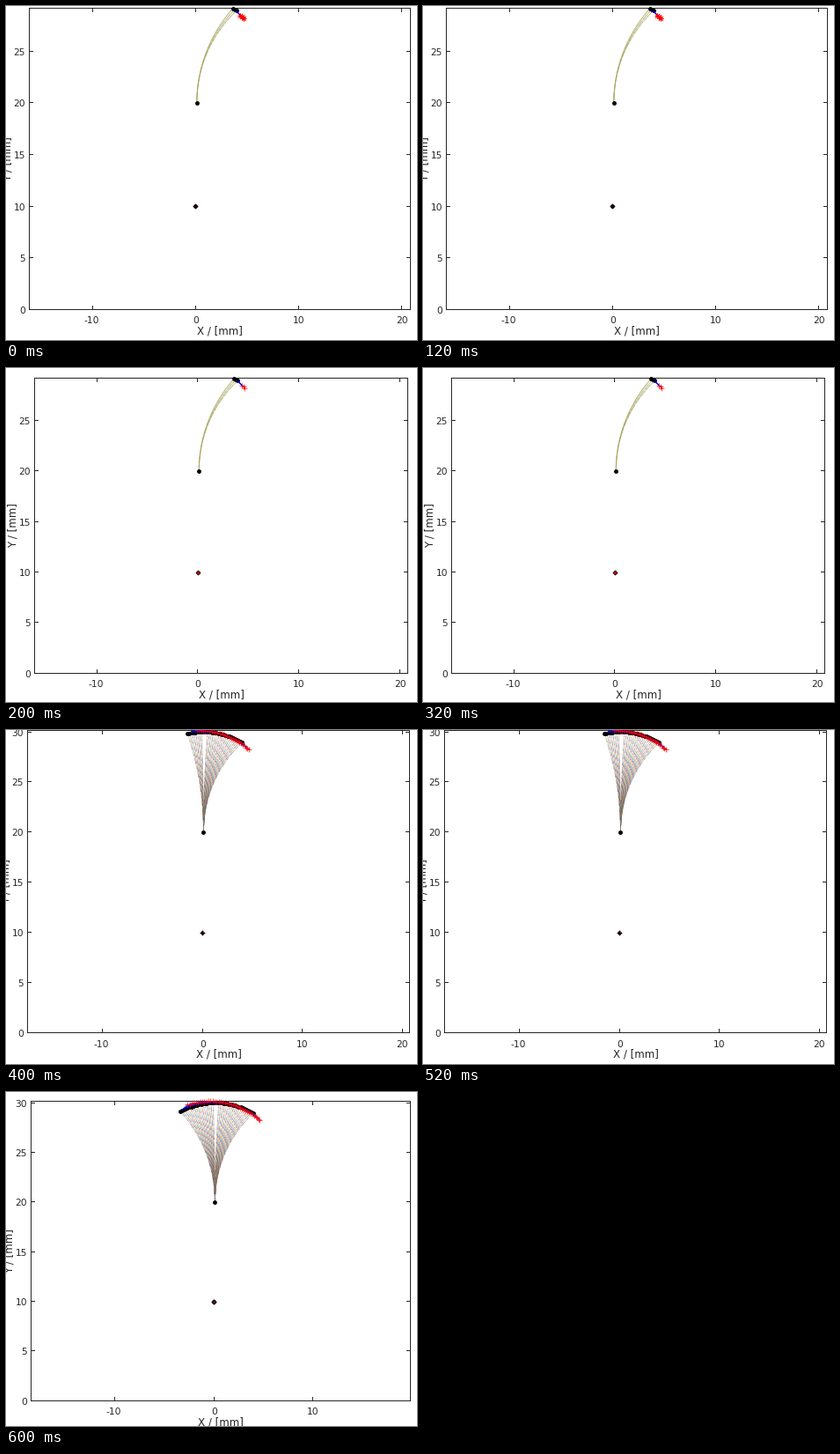
Write a matplotlib script that moves like this. It is 467x379 px and loops after 800 ms.

```python
import numpy as np
import matplotlib.pyplot as plt
from matplotlib.animation import FuncAnimation
from matplotlib.collections import LineCollection

W, H, DPI = 467, 379, 100
PX = 72 / DPI
INK = "#262626"
OLIVE = "#a3a552"
PALETTE = ["#0072bd", "#d95319", "#edb120", "#7e2f8e", "#77ac30", "#4dbeee", "#a2142f"]

ROOT = np.array([0.13, 20.0])
LENGTH = 10.0
START, STEP = 46.5, 2.325      # bending angle in degrees
STRAIGHT = (19, 20)            # nearly straight poses have no visible beam

# left, right, top, bottom, x of origin, pixels per mm, last pose, tip marker, pivot style
VIEWS = [
    (26, 459, 2, 344, 215.5, 11.71, 2, (8, 2, 0), "dark"),
    (32, 456, 11, 346, 218, 11.47, 2, "+", "red"),
    (24, 458, 0, 343, 223.2, 11.37, 28, "+", "dot"),
    (28, 459, 10, 350, 236.2, 11.27, 38, "+", "diamond"),
]

fig = plt.figure(figsize=(W / DPI, H / DPI), dpi=DPI, facecolor="white")
ax = fig.add_axes([0, 0, 1, 1])


def bend(angle, s):
    """Points of a constant-curvature beam at the relative lengths s."""
    s = np.asarray(s, float)
    if abs(angle) < 1e-6:
        return np.stack([ROOT[0] + 0 * s, ROOT[1] + LENGTH * s], -1)
    x = (1 - np.cos(angle * s)) / angle
    y = np.sin(angle * s) / angle
    return ROOT + LENGTH * np.stack([x, y], -1)


def pixel_center(v):
    return np.floor(v) + 0.5


def line(xs, ys, color=INK, width=1.0, **kw):
    ax.plot(xs, ys, color=color, lw=width * PX, snap=False, **kw)


def mark(point, shape, size, color, edge=0.8, **kw):
    ax.plot(*point, marker=shape, ms=size * PX, color=color, mew=edge * PX, ls="", **kw)


def label(x, y, text, size=10.6, **kw):
    style = dict(ha="center", va="center_baseline", color=INK, family="DejaVu Sans")
    style.update(kw)
    ax.text(x, y, text, fontsize=size * PX, **style)


def draw_axes(left, right, top, bottom, to_px):
    l, r, t, b = (v + 0.5 for v in (left, right, top, bottom))
    line([l, r, r, l, l], [t, t, b, b, t], solid_joinstyle="miter")
    for value in range(-10, 21, 10):
        x = pixel_center(to_px((value, 0))[0])
        if l < x < r:
            line([x, x], [b, b - 4])
            line([x, x], [t, t + 4])
            label(x - (1 if value < 0 else 0), b + 12, str(value))
    for value in range(0, 31, 5):
        y = pixel_center(to_px((0, value))[1])
        if t < y <= b:
            line([l, l + 4], [y, y])
            line([r, r - 4], [y, y])
            label(l - 4.5, y + 0.5, str(value), ha="right")
    label((l + r) / 2, b + 23, "X / [mm]", 11.9)
    label(l - 24.5, (t + b) / 2, "Y / [mm]", 11.9, rotation=90, va="center")


def draw_beam(angle, index, few, to_px):
    points = to_px(bend(angle, np.linspace(0, 1 if few else 0.97, 49)))
    segments = np.stack([points[:-1], points[1:]], axis=1)
    if few:
        colors = [OLIVE, "#c9b98c", OLIVE, "#a9a99c"] if index < 2 else [OLIVE]
    else:
        shift = 3 * index % 7
        colors = PALETTE[shift:] + PALETTE[:shift]
    ax.add_collection(LineCollection(segments, colors=colors, capstyle="butt",
                                     linewidths=(0.9 if few else 0.8) * PX,
                                     alpha=0.9 if few else 0.6))


def draw_tip(angle, shape, to_px):
    tip = bend(angle, 1)
    end = tip + [np.cos(angle), -np.sin(angle)]
    a, b = to_px(tip), to_px(end)
    line([a[0], b[0]], [a[1], b[1]], "blue", 0.8, zorder=3)
    mark(a, "o", 4, "black", zorder=3)
    mark(b, shape, 6, "red", 0.7, zorder=3)


def draw_pivot(style, to_px):
    p = to_px((0, 10))
    if style == "dark":
        mark(p, "o", 4, "black")
        mark(p, "+", 6, "#300000")
    elif style == "red":
        mark(p, "D", 3.6, "#d00000", mec="black")
    elif style == "dot":
        mark(p, "o", 3.6, "black")
        mark(p, "+", 6, "black")
        mark(p + [0.6, -0.6], "s", 1.4, "red", 0)
    else:
        mark(p, "D", 3.6, "#7a1010", 1.2, mec="black")


def draw(frame):
    left, right, top, bottom, x0, scale, last, shape, pivot = VIEWS[frame]

    def to_px(p):
        return np.asarray(p, float) * [scale, -scale] + [x0 - 0.2, bottom + 0.2]

    ax.clear()
    ax.set(xlim=(0, W), ylim=(H, 0))
    ax.axis("off")
    draw_axes(left, right, top, bottom, to_px)
    few = last < 5
    for i in range(last + 1):
        angle = np.radians(START - STEP * i)
        if i not in STRAIGHT:
            draw_beam(angle, i, few, to_px)
        draw_tip(angle, shape, to_px)
    mark(to_px(ROOT), "o", 4, "black", zorder=3)
    draw_pivot(pivot, to_px)
    return []


anim = FuncAnimation(fig, draw, frames=len(VIEWS), interval=200, repeat=True,
                     repeat_delay=0, init_func=lambda: [], blit=False)
plt.show()
```
